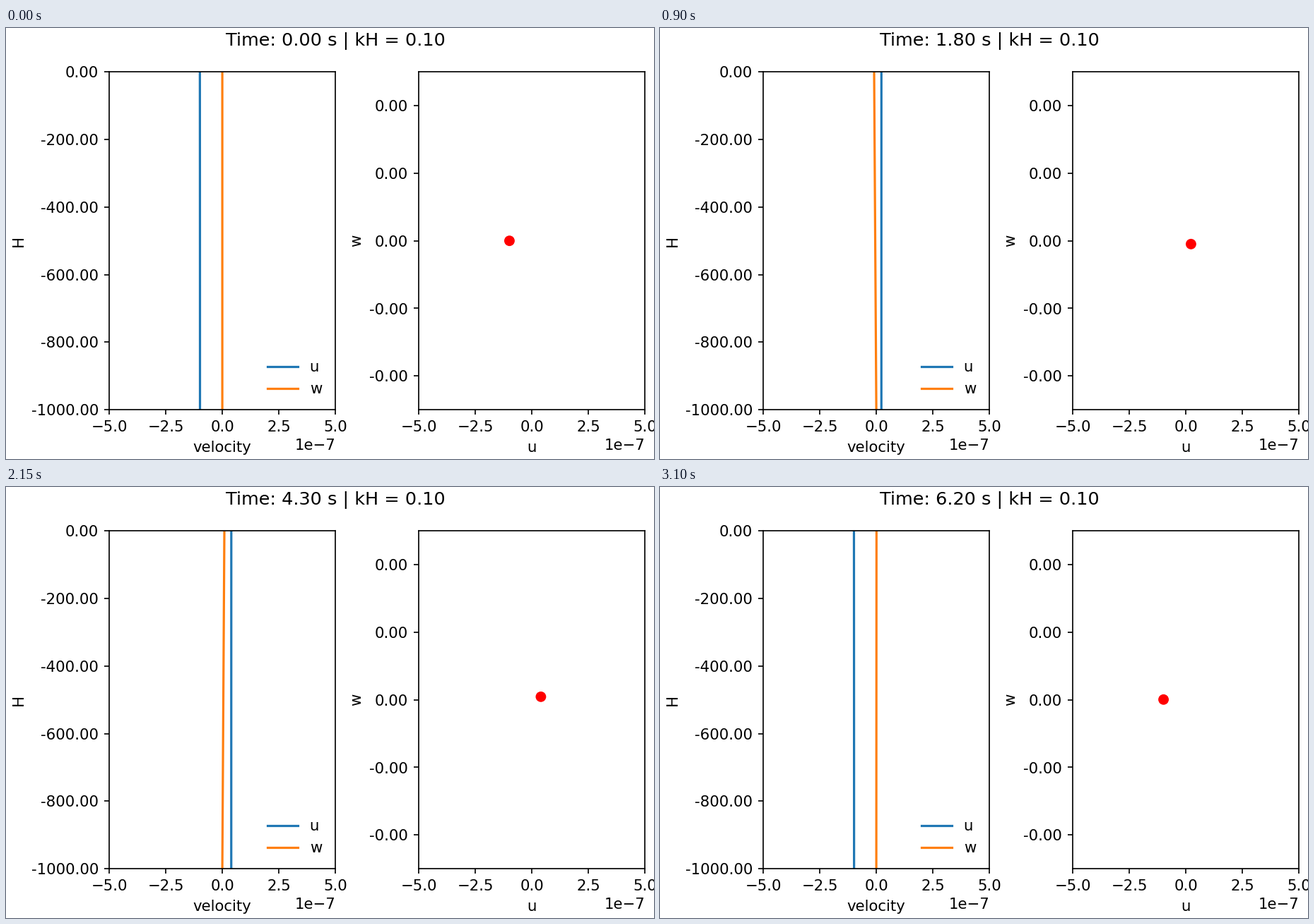
A matplotlib script that plays this animation: 917 px wide and 611 px high, repeating every 3150 ms.

```python
import numpy as np
import matplotlib.pyplot as plt
from matplotlib.animation import FuncAnimation
from matplotlib.patches import Ellipse
from matplotlib.ticker import FormatStrFormatter

W, H = 917, 611
DPI = W / 6
FRAMES, INTERVAL, DT = 63, 50, 0.1
LIM = 5e-7

# Linear shallow-water wave: depth, wave number, amplitude
DEPTH, KH, AMP, G = 1000.0, 0.1, 1e-6, 9.81
K = KH / DEPTH
OMEGA = np.sqrt(G * K * np.tanh(KH))
SCALE = AMP * OMEGA / np.sinh(KH)

plt.rcParams["font.family"] = "DejaVu Sans"
fig = plt.figure(figsize=(6, (H + 0.01) / DPI), dpi=DPI, facecolor="white")


def add_panel(left, xlabel, ylabel, ylim, yticks):
    """Axes in stage pixels, 320 by 479, with the shared velocity axis."""
    ax = fig.add_axes([left / W, 1 - 541.2 / H, 320 / W, 479 / H])
    ax.set(xlim=(-LIM, LIM), ylim=ylim, xlabel=xlabel, ylabel=ylabel)
    ax.set_xticks(np.linspace(-LIM, LIM, 5))
    ax.set_yticks(yticks)
    ax.yaxis.set_major_formatter(FormatStrFormatter("%.2f"))
    return ax


def velocity(z, t):
    u = -SCALE * np.cosh(K * (z + DEPTH)) * np.cos(t)
    w = -SCALE * np.sinh(K * (z + DEPTH)) * np.sin(t)
    return u, w


profile = add_panel(146.1, "velocity", "H", (-DEPTH, 0), range(-1000, 1, 200))
orbit = add_panel(584.2, "u", "w", (-LIM, LIM), [-4e-7, -2e-7, 0, 2e-7, 4e-7])

z = np.linspace(-DEPTH, 0, 50)
u_line, = profile.plot([], [], color="C0", label="u", snap=False)
w_line, = profile.plot([], [], color="C1", label="w", snap=False)
profile.legend(loc="lower right", frameon=False)

size = 7 * DPI / 72
dot = Ellipse((0, 0), size * 2 * LIM / 320, size * 2 * LIM / 479,
              facecolor="red", linewidth=0, zorder=2)
orbit.add_patch(dot)

title = fig.text(466 / W, 1 - 6.4 / H, "", fontsize=12, ha="center", va="top")


def update(i):
    t = i * DT
    u, w = velocity(z, t)
    u_line.set_data(u, z)
    w_line.set_data(w, z)
    dot.set_center((u[-1], w[-1]))
    title.set_text(f"Time: {t:.2f} s | kH = {KH:.2f}")
    return u_line, w_line, dot, title


anim = FuncAnimation(fig, update, frames=FRAMES, interval=INTERVAL,
                     init_func=lambda: update(0), repeat=True, repeat_delay=0)
plt.show()
```
